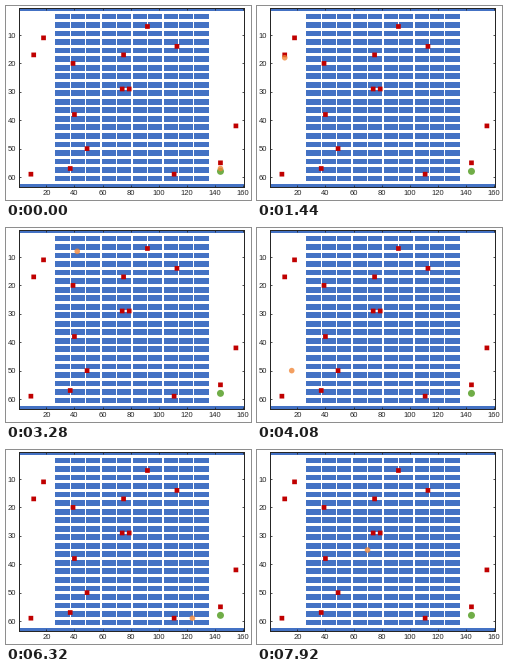
A matplotlib script for the animation above (8000 ms loop, 245 px wide and 194 px high).

```python
import numpy as np
import matplotlib.pyplot as plt
from matplotlib.animation import FuncAnimation
from matplotlib.patches import Ellipse, Rectangle

W, H, DPI = 245, 194, 100
FRAMES, INTERVAL = 100, 80
CELLS_PER_FRAME = 10
PX = 72 / DPI  # one pixel in points

COLS, ROWS = 160, 63
LEFT, RIGHT, TOP, BOTTOM = 12.97, 237.64, 2.03, 180.97
SX, SY = (RIGHT - LEFT) / COLS, (BOTTOM - TOP) / ROWS  # pixels per cell

BLUE, RED, GREEN, ORANGE = "#4472C4", "#C00000", "#70AD47", "#F08434"
INK = "#262626"

plt.rcParams["font.family"] = "Liberation Sans"

# Picking points and depot, in warehouse cells
SOUTHWEST, NORTH = (9, 59), (92, 7)
ITEMS = [SOUTHWEST, NORTH, (18, 11), (11, 17), (39, 20), (75, 17), (113, 14),
         (74, 29), (79, 29), (40, 38), (49, 50), (37, 57), (111, 59),
         (155, 42), (144, 55)]
DEPOT = (144, 58)

# Places the picker heads for, with an optional wait in cells of travel
STOPS = [(144, 57), (144, 14), (81, 17), (11, 18), (*SOUTHWEST, 1), (10, 29),
         (81, 8), NORTH, (92, 8), (37, 59), SOUTHWEST, (10, 50), (18, 8),
         (*NORTH, 15), (92, 14), (155, 43), (137, 59), SOUTHWEST, (12, 35),
         (81, 35)]


def timetable(stops):
    """Times and corners at unit speed, going along the row, then the column."""
    t, (px, py) = 0, stops[0]
    rows = [(t, px, py)]
    for x, y, *wait in stops[1:]:
        t += abs(x - px)
        rows.append((t, x, py))
        t += abs(y - py)
        rows.append((t, x, y))
        if wait:
            t += wait[0]
            rows.append((t, x, y))
        px, py = x, y
    return np.array(rows, float).T


times, xs, ys = timetable(STOPS)

fig = plt.figure(figsize=(W / DPI, H / DPI), dpi=DPI, facecolor="white")
ax = fig.add_axes([LEFT / W, 1 - BOTTOM / H, (RIGHT - LEFT) / W, (BOTTOM - TOP) / H])
ax.set_xlim(0.5, COLS + 0.5)
ax.set_ylim(ROWS + 0.5, 0.5)
ax.set_xticks(range(20, 161, 20))
ax.set_yticks(range(10, 61, 10))
ax.tick_params(direction="in", top=True, right=True, length=2 * PX,
               width=0.8 * PX, pad=2.7 * PX, labelsize=7.7 * PX,
               color=INK, labelcolor=INK)
for spine in ax.spines.values():
    spine.set_linewidth(PX)
    spine.set_color(INK)


def block(x, y, w, h):
    ax.add_patch(Rectangle((x, y), w, h, facecolor=BLUE, linewidth=0))


def square(x, y, size, color):
    w, h = size / SX, size / SY
    ax.add_patch(Rectangle((x - w / 2, y - h / 2), w, h, facecolor=color,
                           linewidth=0, snap=False, zorder=4))


def disc(x, y, size, color, **kw):
    return ax.add_patch(Ellipse((x, y), size / SX, size / SY, facecolor=color,
                                linewidth=0, **kw))


# Outer walls, then 10 by 20 shelves with one-cell aisles
for y in (0.5, ROWS - 0.5):
    block(0.5, y, COLS, 1)
for col in range(10):
    for row in range(20):
        block(26.5 + 11 * col, 2.5 + 3 * row, 10, 2)

disc(*DEPOT, 7, GREEN, zorder=3)
for item in ITEMS:
    square(*item, 4.7, RED)
picker = disc(*STOPS[0], 5.6, ORANGE, alpha=0.78, zorder=5)


def draw(frame):
    t = frame * CELLS_PER_FRAME
    picker.set_center((np.interp(t, times, xs), np.interp(t, times, ys)))
    return (picker,)


anim = FuncAnimation(fig, draw, frames=FRAMES, interval=INTERVAL,
                     init_func=lambda: draw(0), repeat=True, repeat_delay=0)
plt.show()
```
